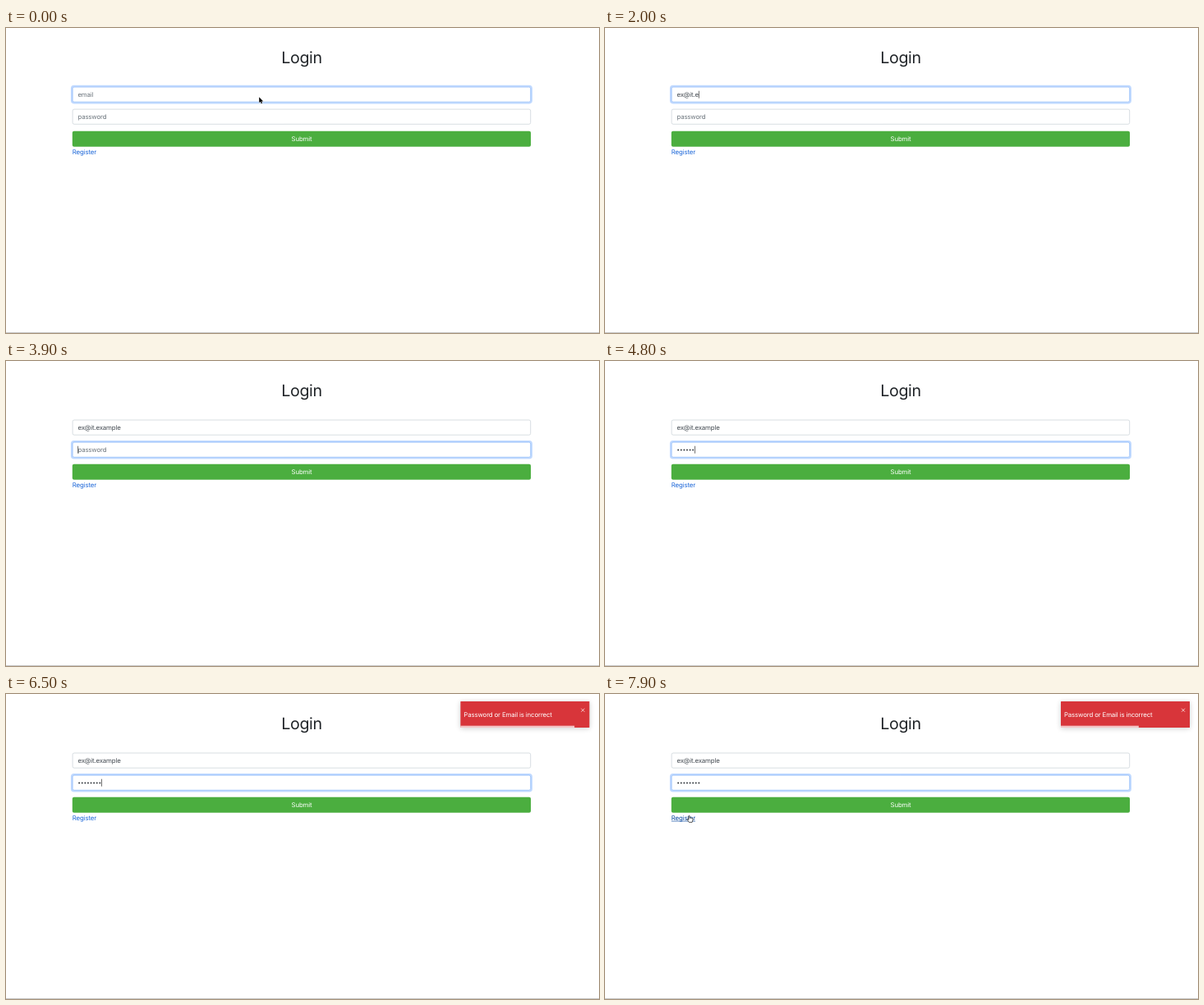
An HTML page with a canvas for the animation above (8000 ms loop, 722 px wide and 372 px high).

```html
<!DOCTYPE html>
<html lang="en">
<head>
<meta charset="utf-8">
<title>Login</title>
<style>
  html, body { margin: 0; width: 100%; height: 100%; overflow: hidden; background: #fff; }
  canvas { display: block; width: 722px; height: 372px; }
</style>
</head>
<body>
<canvas id="stage"></canvas>
<script>
const W = 722, H = 372, LOOP = 8000, STEP = 100;
const SCALE = 0.4906;
const TEXT = 16 * SCALE;
const LEFT = 80.8, WIDTH = 558.2, FIELD_H = 18.8, PAD_X = 87.4;
const EMAIL = 'ex@it.example';
const EMAIL_KEYS = [500, 600, 900, 1000, 1700, 1900, 2000, 2200, 2300, 3000, 3100, 3200, 3400];
const PASS_KEYS = [4100, 4200, 4400, 4600, 4700, 4800, 5000, 5200];
const FOCUS_SWITCH = 3700, TOAST_START = 5920;

const canvas = document.getElementById('stage');
const ctx = canvas.getContext('2d');
const dpr = window.devicePixelRatio || 1;
canvas.width = W * dpr;
canvas.height = H * dpr;

const clamp = v => Math.max(0, Math.min(1, v));
const mix = (a, b, k) => a + (b - a) * k;
const smooth = v => { v = clamp(v); return v * v * (3 - 2 * v); };
const typed = (keys, t) => keys.filter(k => k <= t).length;

// cubic-bezier(.215, .61, .355, 1)
function easeOut(x) {
  const curve = (s, a, b) => 3 * (1 - s) * (1 - s) * s * a + 3 * (1 - s) * s * s * b + s * s * s;
  let lo = 0, hi = 1;
  for (let i = 0; i < 24; i++) {
    const mid = (lo + hi) / 2;
    if (curve(mid, 0.215, 0.355) < x) lo = mid; else hi = mid;
  }
  return curve(lo, 0.61, 1);
}

function setFont(size) {
  ctx.font = `${size}px Inter, "Liberation Sans", sans-serif`;
  ctx.letterSpacing = `${-0.018 * size}px`;
  ctx.textRendering = 'geometricPrecision';
}

function label(str, x, y, color, align = 'left', size = TEXT) {
  setFont(size);
  ctx.textAlign = align;
  ctx.fillStyle = color;
  ctx.fillText(str, x, y);
}

function textWidth(str) {
  setFont(TEXT);
  return ctx.measureText(str).width;
}

function box(x, y, w, h, r) {
  ctx.beginPath();
  ctx.roundRect(x, y, w, h, r);
}

function field(y, focus) {
  if (focus > 0) {
    box(LEFT - 0.9, y - 0.9, WIDTH + 1.8, FIELD_H + 1.8, 2.8);
    ctx.lineWidth = 2;
    ctx.strokeStyle = `rgba(13,110,253,${0.26 * focus})`;
    ctx.stroke();
  }
  box(LEFT + 0.3, y + 0.3, WIDTH - 0.6, FIELD_H - 0.6, 1.9);
  ctx.fillStyle = '#fff';
  ctx.fill();
  ctx.lineWidth = 0.7;
  ctx.strokeStyle = `rgb(${mix(200, 126, focus)},${mix(208, 176, focus)},${mix(214, 248, focus)})`;
  ctx.stroke();
}

function caret(x, y) {
  ctx.fillStyle = '#222';
  ctx.fillRect(x, y, 0.65, 9);
}

function caretOn(keys, t) {
  const last = Math.max(...keys.filter(k => k <= t));
  return Math.floor((t - last) / 500) % 2 === 0;
}

function emailField(t) {
  const count = typed(EMAIL_KEYS, t);
  const value = EMAIL.slice(0, count);
  field(71.7, 1 - smooth((t - FOCUS_SWITCH) / 150));
  if (!count) return label('email', PAD_X, 83.9, '#6c757d');
  label(value, PAD_X, 83.9, '#434a51');
  if (t < FOCUS_SWITCH && caretOn(EMAIL_KEYS, t)) caret(PAD_X + textWidth(value), 76.7);
}

function passwordField(t) {
  const count = typed(PASS_KEYS, t), pitch = 3.6;
  field(98.8, smooth((t - FOCUS_SWITCH) / 150));
  if (!count) label('password', PAD_X, 111, '#6c757d');
  ctx.fillStyle = '#343a40';
  for (let i = 0; i < count; i++) {
    ctx.beginPath();
    ctx.arc(PAD_X + 1.75 + i * pitch, 108.5, 1, 0, Math.PI * 2);
    ctx.fill();
  }
  if (t >= FOCUS_SWITCH && caretOn([FOCUS_SWITCH, ...PASS_KEYS], t)) caret(PAD_X + count * pitch, 103.7);
}

function toastOffset(p) {
  const stops = [[0, 3000], [0.6, -25], [0.75, 10], [0.9, -5], [1, 0]];
  for (let i = 1; i < stops.length; i++) {
    const [p0, x0] = stops[i - 1], [p1, x1] = stops[i];
    if (p < p1) return mix(x0, x1, easeOut((p - p0) / (p1 - p0))) * SCALE;
  }
  return 0;
}

function toast(t) {
  const age = t - TOAST_START;
  if (age < 0) return;
  const w = 157, h = 32, y = 9.1;
  ctx.save();
  ctx.translate(555 + toastOffset(age / 700), 0);
  ctx.globalAlpha = easeOut(clamp(age / 420));
  ctx.shadowColor = 'rgba(0,0,0,0.2)';
  ctx.shadowBlur = 6 * dpr;
  ctx.shadowOffsetY = 0.8 * dpr;
  box(0, y, w, h, 0.5);
  ctx.fillStyle = '#d8353a';
  ctx.fill();
  ctx.shadowColor = 'transparent';
  ctx.fillStyle = 'rgba(255,255,255,0.7)';
  ctx.fillRect(0, y + h - 2.4, w * (1 - age / 5000), 2.4);
  label('Password or Email is incorrect', 4, 27.7, '#fff');
  ctx.beginPath();
  ctx.moveTo(147, 17.7);
  ctx.lineTo(151, 21.7);
  ctx.moveTo(151, 17.7);
  ctx.lineTo(147, 21.7);
  ctx.lineWidth = 0.9;
  ctx.strokeStyle = 'rgba(255,255,255,0.8)';
  ctx.stroke();
  ctx.restore();
}

function pointerAt(t) {
  if (t < 500) return [308.2, 84.2];
  if (t < 7000) return null;
  if (t < 7300) {
    const k = smooth((t - 7000) / 300);
    return [mix(308.2, 292.6, k), mix(84.2, 85.2, k)];
  }
  const k = smooth((t - 7300) / 500);
  return [mix(292.6, 102.6, k), mix(85.2, 148.2, k)];
}

function arrow(x, y) {
  const shape = new Path2D('M0 0V7.1L1.6 5.6L2.6 8L3.8 7.5L2.8 5.2H5Z');
  ctx.save();
  ctx.translate(x, y);
  ctx.lineJoin = 'round';
  ctx.lineWidth = 1;
  ctx.strokeStyle = '#fff';
  ctx.stroke(shape);
  ctx.fillStyle = '#000';
  ctx.fill(shape);
  ctx.restore();
}

function hand(x, y) {
  const shape = new Path2D('M-.7 .6Q0-.4 .7 .6V3Q1.4 2.4 2 3.1Q2.7 2.6 3.2 3.4Q4.1 3.1 4.3 4V5.8L3.5 8.2H-.3L-2.4 5.3Q-2.7 4.1-1.6 4.4L-.7 5.2Z');
  ctx.save();
  ctx.translate(x, y);
  ctx.fillStyle = '#fff';
  ctx.fill(shape);
  ctx.lineJoin = 'round';
  ctx.lineWidth = 0.7;
  ctx.strokeStyle = '#111';
  ctx.stroke(shape);
  ctx.restore();
}

function link(hover) {
  const color = hover ? '#0b4aa0' : '#1b66d8';
  label('Register', LEFT, 153.9, color);
  if (hover) ctx.fillRect(LEFT, 154.8, textWidth('Register'), 0.6);
}

function draw(t) {
  const pos = pointerAt(t);
  ctx.setTransform(dpr, 0, 0, dpr, 0, 0);
  ctx.fillStyle = '#fff';
  ctx.fillRect(0, 0, W, H);
  label('Login', 360, 42.8, '#212529', 'center', 40 * SCALE);
  emailField(t);
  passwordField(t);
  box(LEFT, 125.8, WIDTH, 19, 2);
  ctx.fillStyle = '#4bae3f';
  ctx.fill();
  label('Submit', 360, 138.2, '#fff', 'center');
  link(pos && pos[0] < 111 && pos[1] > 146);
  ctx.fillStyle = '#c9c9c9';
  ctx.fillRect(0, 371, W, 1);
  toast(t);
  if (pos) (pos[1] > 126 ? hand : arrow)(...pos);
}

const start = performance.now();
function tick() {
  const t = (performance.now() - start) % LOOP;
  draw(Math.floor(t / STEP) * STEP);
  requestAnimationFrame(tick);
}
tick();
</script>
</body>
</html>
```
